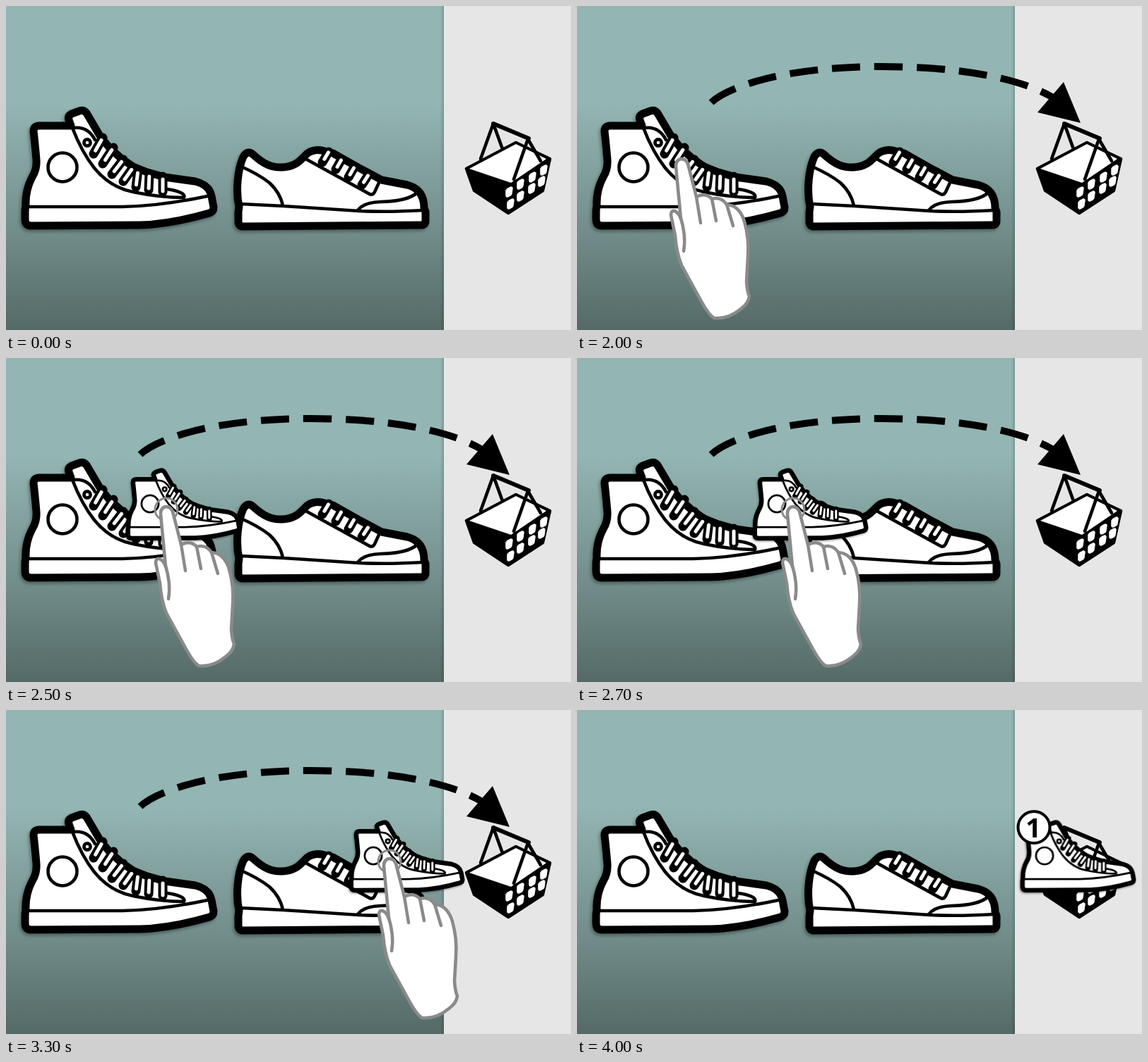
Recreate the animation shown at these times as an HTML page. Size 800 px wide and 460 px high, loop 6000 ms.

```html
<!DOCTYPE html>
<html lang="en">
<head>
<meta charset="utf-8">
<title>Drag a shoe to the basket</title>
<style>
html, body { margin: 0; width: 100%; height: 100%; overflow: hidden; background: #e6e6e6; }
svg { display: block; width: 100vw; height: 100vh; }
path, circle { stroke-linejoin: round; stroke-linecap: round; }
.shoe { filter: drop-shadow(-2px 3px 2px rgba(0,0,0,.32)); }
.outline { fill: #fff; stroke: #000; stroke-width: 11; }
.line { fill: none; stroke: #000; stroke-width: 4.6; }
.lace { fill: none; stroke: #000; stroke-width: 13; }
/* the dash leaves a black knob at the lower end of each lace */
.thread { fill: none; stroke: #fff; stroke-width: 5; stroke-dasharray: 17 99; stroke-dashoffset: -4; }
.low .thread { stroke-dasharray: 11 99; stroke-dashoffset: -1; }
.hand { fill: #fff; stroke: #8a8a8a; stroke-width: 4.6; }
.crease { fill: none; stroke: #8a8a8a; stroke-width: 4.5; }
.ring { fill: none; stroke: #8a8a8a; stroke-width: 3; }
.badge { font: bold 38px "Open Sans", "Noto Sans", sans-serif; text-anchor: middle; }

/* One loop is 6 s, so 100 ms is 1.667% */
.arrow, .drag, .copy, .finger, .ring, .count { animation: 6s step-end infinite; }
.arrow { animation-name: arrow; }
.drag { animation-name: drag; }
.copy { animation-name: copy; }
.finger { animation-name: finger; }
.ring { animation-name: ring; }
.count { animation-name: count; }
@keyframes arrow {
  0%, 66.65%, 100% { visibility: hidden; }
  16.65% { visibility: visible; }
}
@keyframes drag {
  0% { transform: translateX(-158px); }
  38.32% { transform: translateX(-158px); animation-timing-function: steps(12); }
  58.32% { transform: translateX(316px); animation-timing-function: steps(3); }
  63.32%, 100% { transform: translateX(379px); }
}
@keyframes copy {
  0% { visibility: hidden; }
  38.32%, 100% { visibility: visible; }
}
@keyframes finger {
  0% { visibility: hidden; transform: translateY(6px); }
  33.32% { visibility: visible; transform: translateY(6px); }
  34.98% { visibility: visible; transform: none; }
  64.98%, 100% { visibility: hidden; transform: none; }
}
@keyframes ring {
  0%, 64.98%, 100% { visibility: hidden; }
  36.65% { visibility: visible; }
}
@keyframes count {
  0% { visibility: hidden; }
  66.65%, 100% { visibility: visible; }
}
</style>
</head>
<body>
<svg viewBox="0 0 800 460" preserveAspectRatio="none">
  <defs>
    <linearGradient id="wall" gradientUnits="userSpaceOnUse" x1="0" y1="0" x2="0" y2="460">
      <stop offset="0" stop-color="#93b5b3"/>
      <stop offset=".3" stop-color="#93b5b3"/>
      <stop offset=".65" stop-color="#769290"/>
      <stop offset="1" stop-color="#546a67"/>
    </linearGradient>
    <linearGradient id="edge">
      <stop offset="0" stop-opacity="0"/>
      <stop offset="1" stop-opacity=".17"/>
    </linearGradient>
    <path id="highLaces" d="M137 187L124 210M152 201L137 224M166 218L150 239M180 229L166 249M187 233L184 257M203 238L202 261M222 242V264"/>
    <path id="lowLaces" d="M457 207L448 222M475 218L467 232M493 229L485 243M513 240L504 254"/>
    <path id="cell" d="M-4-2Q-3-4-1-5L3-7Q5-7 5-5L4 2Q4 4 2 5L-2 7Q-4 7-4 5Z" fill="#fff" stroke="#fff" stroke-width="1.500"/>
    <g id="highTop" class="shoe">
      <path class="outline" d="M39 178Q39 170 47 170H92L89 162Q87 156 93 153L104 149Q110 147 114 152L134 186 148 203 164 217 180 228 200 236 225 243 268 249Q288 254 291 270L294 286Q294 292 288 294Q232 310 190 311L36 312Q27 312 27 303V292Q27 287 28 284Q27 262 37 243Q44 232 43 218Q41 195 39 178Z"/>
      <path class="line" d="M30 285H165Q220 284 290 269"/>
      <path class="line" d="M94 173Q107 207 125 230Q148 258 180 264Q218 272 252 272Q255 264 228 260M97 173Q116 171 126 190"/>
      <circle class="line" cx="80" cy="229" r="20.5"/>
      <circle class="line" cx="115" cy="194" r="4.6"/>
      <use href="#highLaces" class="lace"/>
      <use href="#highLaces" class="thread"/>
    </g>
  </defs>

  <rect width="800" height="460" fill="#e6e6e6"/>
  <rect width="620" height="460" fill="url(#wall)"/>
  <rect x="615" width="5" height="460" fill="url(#edge)"/>

  <use href="#highTop"/>

  <g class="shoe low">
    <path class="outline" d="M330 285C325 262 328 232 336 214Q342 204 350 211C364 224 376 230 392 229C412 228 418 217 427 209Q436 203 447 205L463 209 500 230 532 247 568 254Q592 260 592 287L594 292V305Q594 311 588 311L336 313Q329 313 329 306V292Z"/>
    <path class="line" d="M332 281L393 284 500 291Q540 293 591 290M333 228Q358 239 373 251Q388 265 392 283M426 218L513 266Q519 270 522 264L528 251M498 290Q506 279 530 278Q570 277 582 265"/>
    <use href="#lowLaces" class="lace"/>
    <use href="#lowLaces" class="thread"/>
  </g>

  <g>
    <path d="M652 231L722 194 770 217 760 262 711 294 663 262Z" stroke="#000" stroke-width="4.500"/>
    <path d="M656 231L722 196 765 217 715 251Z" fill="#fff"/>
    <path class="line" d="M672 217L690 167 703 203M739 189L719 246M739 189L757 220"/>
    <path class="line" d="M690 167L740 188" style="stroke-width:6"/>
    <use href="#cell" x="712" y="264"/>
    <use href="#cell" x="728" y="253"/>
    <use href="#cell" x="745" y="243"/>
    <use href="#cell" x="761" y="233"/>
    <use href="#cell" x="714" y="281"/>
    <use href="#cell" x="728" y="270"/>
    <use href="#cell" x="744" y="259"/>
    <use href="#cell" x="758" y="249"/>
  </g>

  <g class="arrow">
    <path d="M190 137C215 113 300 86 430 86C540 86 627 102 674 130" fill="none" stroke="#000" stroke-width="10" stroke-dasharray="40 20" style="stroke-linecap:butt"/>
    <path d="M689 108L713 166 652 151Z"/>
  </g>

  <g class="drag">
    <g class="copy"><use href="#highTop" transform="translate(235.8 71.9) scale(.59)"/></g>
    <circle class="ring" cx="306" cy="215" r="16"/>
    <g class="finger">
      <path class="hand" d="M298 222C297 208 314 207 316 222L327 265Q340 258 349 268Q362 264 370 276Q388 277 395 300Q402 325 400 350L398 385Q399 400 402 406Q401 416 390 424Q372 439 352 437Q345 433 335 415L306 362Q299 345 297 320L291 291Q291 284 296 285Q302 287 305 296Z"/>
      <path class="crease" d="M327 265L333 302M349 268L355 299M370 276L379 306M304 292Q313 320 309 342"/>
    </g>
  </g>

  <g class="count">
    <circle cx="647" cy="166.500" r="22.500" fill="#fff" stroke="#000" stroke-width="4"/>
    <text class="badge" x="646" y="181">1</text>
  </g>
</svg>
</body>
</html>
```
